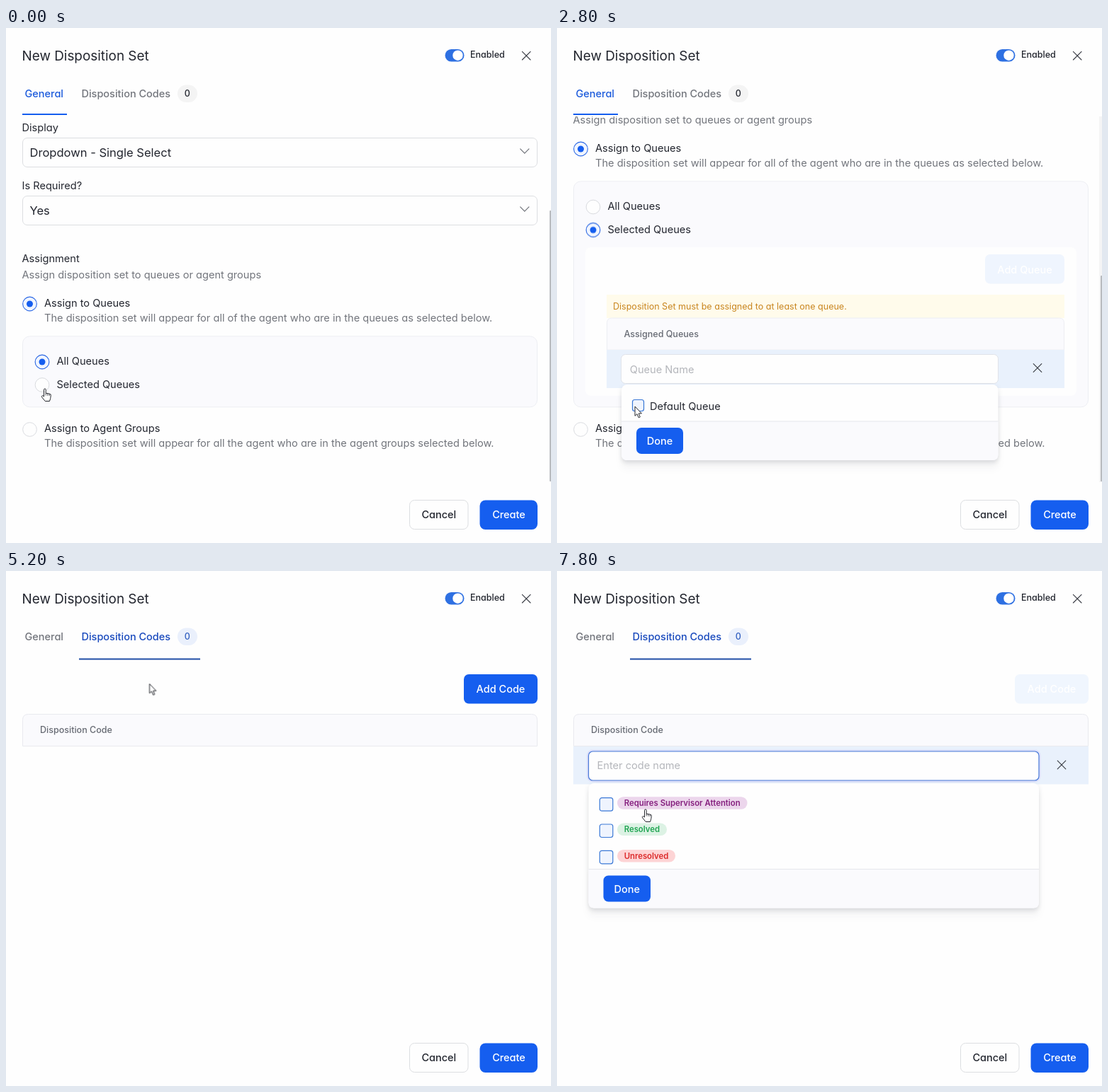
An HTML page that plays this animation: 769x728 px, repeating every 8000 ms.

```html
<!DOCTYPE html>
<html lang="en">
<head>
<meta charset="utf-8">
<title>New Disposition Set</title>
<style>
html, body { margin: 0; width: 100%; height: 100%; overflow: hidden; background: #fefefe; }
svg { display: block; width: 769px; height: 728px; }
text { font: 400 14.6px Inter, "Noto Sans", sans-serif; font-feature-settings: "cv11"; font-optical-sizing: none; fill: #23262f; white-space: pre; }
.title { font-size: 18.9px; }
.value { font-size: 16.56px; }
.mid { font-size: 14.49px; font-weight: 500; }
.small { font-size: 12.54px; }
.pill { font-size: 11.33px; font-weight: 600; }
.grey { fill: #72757c; }
.head { fill: #666a73; }
.hint { fill: #b4b6bb; }
.white { fill: #fff; }
.warn { fill: #c98620; }
.btn { fill: #155eef; }
.box { fill: #fefefe; stroke: #dcdee1; }
.panel { fill: #fafafd; stroke: #edeef3; }
.row { fill: #e9f1fc; }
.line { fill: none; stroke: #3a3d45; stroke-width: 1.15; stroke-linecap: round; stroke-linejoin: round; }
.edge { stroke: #e6e7ec; }
.check { fill: #eff4fe; stroke: #3a78d6; stroke-width: 1.2; }
.focus { fill: none; stroke: #dcdffa; stroke-width: 5; }
.focus + rect { fill: #fefefe; stroke: #4678d8; stroke-width: 1.2; }
.menu { filter: drop-shadow(0 3px 3px rgba(16,24,40,.13)) drop-shadow(0 11px 5px rgba(16,24,40,.04)); }

/* 2.5% of the loop is one 200 ms step */
.t { animation: 8s step-end infinite; }
.general { animation-name: general; }
.codes { animation-name: codes; }
.scroll { animation-name: scroll; }
.thumb { animation-name: thumb; fill: #b9bbbf; }
.track { animation-name: menu; fill: #f4f4f5; }
.all { animation-name: all; }
.selected { animation-name: selected; }
.outer { animation-name: outer; }
.inner { animation-name: inner; }
.agents { animation-name: agents; }
.table { animation-name: table; }
.warning { animation-name: warning; }
.edit { animation-name: edit; }
.pick { animation-name: menu; }
.queueFocus { animation-name: queueFocus; }
.ticked { animation-name: ticked; }
.assigned { animation-name: assigned; }
.addQueue { animation-name: addQueue; }
.addCode { animation-name: addCode; }
.codeRow { animation-name: codeRow; }
.codeMenu { animation-name: codeMenu; }
.codeCaret { animation-name: codeCaret; }
.cursor { animation-name: move; }
.arrow { animation-name: arrow; }
.hand { animation-name: hand; }

@keyframes general { 0% { opacity: 1 } 57.5% { opacity: 0 } }
@keyframes codes { 0% { opacity: 0 } 57.5% { opacity: 1 } }
@keyframes scroll { 0% { transform: translateY(0) } 22.5% { transform: translateY(-219px) } }
@keyframes thumb {
  0% { y: 258px; height: 383px }
  7.5% { y: 231px; height: 310px }
  22.5% { y: 350px; height: 291px }
  45% { y: 345px; height: 284px }
}
@keyframes all { 0% { opacity: 1 } 7.5% { opacity: 0 } }
@keyframes selected { 0% { opacity: 0 } 7.5% { opacity: 1 } }
@keyframes outer { 0% { height: 100px } 7.5% { height: 265px } 22.5% { height: 319px } 45% { height: 343px } }
@keyframes inner { 0% { height: 156px } 22.5% { height: 210px } 45% { height: 233px } }
@keyframes agents {
  0% { transform: translateY(0) }
  7.5% { transform: translateY(165px) }
  22.5% { transform: translateY(219px) }
  45% { transform: translateY(242.5px) }
}
@keyframes table { 0% { transform: translateY(0) } 45% { transform: translateY(-32.5px) } }
@keyframes warning { 0% { opacity: 1 } 45% { opacity: 0 } }
@keyframes edit { 0% { opacity: 0 } 22.5% { opacity: 1 } }
@keyframes menu { 0% { opacity: 0 } 22.5% { opacity: 1 } 45% { opacity: 0 } }
@keyframes queueFocus { 0% { opacity: 0 } 22.5% { opacity: 1 } 35% { opacity: 0 } }
@keyframes ticked { 0% { opacity: 0 } 37.5% { opacity: 1 } }
@keyframes assigned { 0% { opacity: 0 } 45% { opacity: 1 } }
@keyframes addQueue { 0% { fill: #155eef } 15% { fill: #004eeb } 25% { fill: #eff5fe } }
@keyframes addCode {
  0% { fill: #155eef }
  72.5% { fill: #004eeb }
  77.5% { fill: #155eef }
  82.5% { fill: #93b3fb }
  85% { fill: #f0f6fe }
}
@keyframes codeRow { 0% { opacity: 0 } 82.5% { opacity: 1 } }
@keyframes codeMenu { 0% { opacity: 0 } 85% { opacity: 1 } }
@keyframes codeCaret { 0% { opacity: 0 } 85% { opacity: 1 } 97.5% { opacity: 0 } }
@keyframes move {
  0% { transform: translate(55px, 510px) }
  5% { transform: translate(55px, 510px); animation-timing-function: steps(4) }
  15% { transform: translate(619.5px, 562px) }
  22.5% { transform: translate(619.5px, 562px); animation-timing-function: steps(4) }
  32.5% { transform: translate(110px, 535px) }
  37.5% { transform: translate(110px, 535px); animation-timing-function: steps(2) }
  42.5% { transform: translate(140px, 582px) }
  47.5% { transform: translate(138px, 544px) }
  50% { transform: translate(145px, 400px); animation-timing-function: steps(2) }
  55% { transform: translate(168px, 95px) }
  60% { transform: translate(168px, 95px); animation-timing-function: steps(2) }
  65% { transform: translate(202.5px, 159.5px) }
  67.5% { transform: translate(300px, 118px); animation-timing-function: steps(2) }
  72.5% { transform: translate(695px, 168px) }
  75% { transform: translate(695px, 168px); animation-timing-function: steps(2) }
  80% { transform: translate(162px, 216px) }
  82.5% { transform: translate(210.5px, 237px); animation-timing-function: steps(5) }
  95% { transform: translate(135px, 352px) }
  97.5% { transform: translate(125px, 337px) }
}
@keyframes arrow {
  0% { opacity: 0 } 7.5% { opacity: 1 } 15% { opacity: 0 } 22.5% { opacity: 1 }
  37.5% { opacity: 0 } 47.5% { opacity: 1 } 55% { opacity: 0 } 62.5% { opacity: 1 }
  72.5% { opacity: 0 } 77.5% { opacity: 1 } 92.5% { opacity: 0 }
}
@keyframes hand {
  0% { opacity: 1 } 7.5% { opacity: 0 } 15% { opacity: 1 } 22.5% { opacity: 0 }
  37.5% { opacity: 1 } 47.5% { opacity: 0 } 55% { opacity: 1 } 62.5% { opacity: 0 }
  72.5% { opacity: 1 } 77.5% { opacity: 0 } 92.5% { opacity: 1 }
}
</style>
</head>
<body>
<svg viewBox="0 0 769 728">
  <defs>
    <circle id="off" r="9.85" fill="#fefefe" stroke="#d9dbdf"/>
    <g id="on">
      <circle r="9.85" fill="#f0f5ff" stroke="#2c69e6" stroke-width="1.1"/>
      <circle r="4.5" fill="#155eef"/>
    </g>
    <path id="cross" class="line" d="M-5.8-5.8 5.8 5.8M5.8-5.8-5.8 5.8"/>
    <path id="chevron" class="line" d="M-6.1-3.2 0 3.2 6.1-3.2" style="stroke:#6d7077"/>
    <rect id="tick" class="check" width="18.5" height="18.5" rx="3"/>
    <clipPath id="view"><rect y="125" width="769" height="517"/></clipPath>
  </defs>

  <text class="title" x="22.5" y="45.5">New Disposition Set</text>
  <rect x="619.5" y="30" width="27" height="17.5" rx="8.75" fill="#2e70e2"/>
  <circle cx="637.5" cy="38.7" r="7.2" fill="#fff"/>
  <text class="mid small" x="655" y="42.3">Enabled</text>
  <use href="#cross" x="734.2" y="39.2"/>

  <g class="t general">
    <text class="mid" x="26.5" y="98" style="fill:#1c5bdc">General</text>
    <text class="mid grey" x="106.5" y="98">Disposition Codes</text>
    <rect x="23" y="121" width="63" height="2" fill="#155eef"/>
    <rect x="242" y="80.5" width="28" height="24.5" rx="12.2" fill="#f4f4f4"/>
    <text class="mid small" x="255.7" y="97.3" text-anchor="middle">0</text>

    <g clip-path="url(#view)">
      <g class="t scroll">
        <text x="22.5" y="146">Display</text>
        <rect class="box" x="23.5" y="155.5" width="726" height="41" rx="6.5"/>
        <text class="value" x="33.5" y="181.5">Dropdown - Single Select</text>
        <use href="#chevron" x="731.8" y="174"/>
        <text x="22.5" y="228">Is Required?</text>
        <rect class="box" x="23.5" y="237.5" width="726" height="41" rx="6.5"/>
        <text class="value" x="33.5" y="263.5">Yes</text>
        <use href="#chevron" x="731.8" y="256"/>

        <text x="22.5" y="331">Assignment</text>
        <text class="grey" x="22.5" y="354">Assign disposition set to queues or agent groups</text>
        <use href="#on" x="33.5" y="390"/>
        <text x="54" y="394">Assign to Queues</text>
        <text class="grey" x="54" y="414.7">The disposition set will appear for all of the agent who are in the queues as selected below.</text>

        <rect class="panel t outer" x="23.5" y="435.8" width="726" height="100" rx="10"/>
        <use href="#off" x="51" y="472"/>
        <use href="#on" class="t all" x="51" y="472"/>
        <text x="71.5" y="476">All Queues</text>
        <use href="#off" x="51" y="504.5"/>
        <use href="#on" class="t selected" x="51" y="504.5"/>
        <text x="71.5" y="508.5">Selected Queues</text>

        <g class="t agents">
          <use href="#off" x="33.5" y="567.5"/>
          <text x="54" y="571.3">Assign to Agent Groups</text>
          <text class="grey" x="54" y="592">The disposition set will appear for all the agent who are in the agent groups selected below.</text>
        </g>

        <g class="t selected">
          <g transform="translate(0 219)">
            <rect class="t inner" x="40" y="310" width="693" height="156" rx="8" fill="#fefefe"/>
            <rect class="btn t addQueue" x="604" y="320" width="112" height="41.5" rx="7"/>
            <text class="mid white" x="660" y="346.7" text-anchor="middle">Add Queue</text>
            <g class="t warning">
              <rect x="70" y="377" width="646" height="33" fill="#fffbeb"/>
              <text class="small warn" x="79" y="397.5">Disposition Set must be assigned to at least one queue.</text>
            </g>
            <g class="t table">
              <g class="t assigned">
                <rect class="edge" x="70.5" y="410" width="645" height="154.5" rx="7" fill="#fefefe"/>
                <text x="94.5" y="542.3">Default Queue</text>
                <path class="line" style="stroke:#d12a2a;stroke-width:1.3" d="M643.5 531h11.6M646.8 531v-2h5v2M645 531v11h8.8V531M647.8 534v5M651 534v5"/>
              </g>
              <path class="panel" d="M70.5 455V417q0-7 7-7h631q7 0 7 7v38z"/>
              <text class="mid small head" x="94.5" y="436.5">Assigned Queues</text>
              <g class="t edit">
                <rect class="row" x="70" y="455" width="646" height="54"/>
                <rect class="box" x="90.5" y="461.5" width="532" height="41" rx="6" style="stroke:#e0e3e9"/>
                <g class="t queueFocus">
                  <rect class="focus" x="90.5" y="461.5" width="532" height="41" rx="6"/>
                  <rect x="90.5" y="461.5" width="532" height="41" rx="6"/>
                  <rect x="103.3" y="473.5" width="1.2" height="18" fill="#333"/>
                </g>
                <text class="hint" x="102.8" y="487.5">Queue Name</text>
                <use href="#cross" x="678" y="480.5"/>
              </g>
            </g>
            <g class="t pick">
              <g class="menu">
                <rect x="91" y="504" width="531.5" height="107" rx="8" fill="#fefefe"/>
                <path d="M91 556h531.5v47q0 8-8 8H99q-8 0-8-8z" fill="#fafafd"/>
              </g>
              <path class="edge" d="M91 556h531.5"/>
              <rect class="check" x="106.5" y="525.5" width="16" height="16" rx="3"/>
              <path class="line t ticked" d="M110.5 533.8l3 3 5.5-6" style="stroke:#155eef"/>
              <text x="131" y="539.7">Default Queue</text>
              <rect class="btn" x="112" y="565" width="66" height="37" rx="7"/>
              <text class="mid white" x="145" y="588.7" text-anchor="middle">Done</text>
            </g>
          </g>
        </g>
      </g>
    </g>
    <rect class="t track" x="765" y="125" width="4" height="517"/>
    <rect class="t thumb" x="767" y="258" width="3" height="383" rx="1"/>
  </g>

  <g class="t codes">
    <text class="mid grey" x="26.5" y="98">General</text>
    <text class="mid" x="106.5" y="98" style="fill:#1849bd">Disposition Codes</text>
    <rect x="103" y="123.5" width="171" height="2" fill="#1f4da6"/>
    <rect x="242" y="80.5" width="28" height="24.5" rx="12.2" fill="#eaf0fc"/>
    <text class="mid small" x="255.7" y="97.3" text-anchor="middle" style="fill:#315fc0">0</text>

    <rect class="btn t addCode" x="646" y="146" width="104" height="41.5" rx="7"/>
    <text class="mid white" x="698" y="172" text-anchor="middle">Add Code</text>
    <path class="panel" d="M23.5 247.5V210.5q0-8 8-8h710q8 0 8 8v37z" style="stroke:#e9eaef"/>
    <text class="mid small head" x="48" y="229">Disposition Code</text>

    <g class="t codeRow">
      <rect class="row" x="23" y="248" width="727" height="53.5"/>
      <rect class="box" x="44.5" y="255" width="635.5" height="41" rx="6" style="stroke:#e0e3e9"/>
      <g class="t codeMenu">
        <rect class="focus" x="44.5" y="255" width="635.5" height="41" rx="6"/>
        <rect x="44.5" y="255" width="635.5" height="41" rx="6"/>
      </g>
      <rect class="t codeCaret" x="57" y="266.5" width="1.2" height="18" fill="#333"/>
      <text class="hint" x="56.5" y="280.3">Enter code name</text>
      <use href="#cross" x="712" y="274"/>
    </g>

    <g class="t codeMenu">
      <g class="menu">
        <rect x="44.5" y="300" width="635.5" height="176.5" rx="8" fill="#fefefe"/>
        <path d="M44.5 421.5H680v47q0 8-8 8H52.5q-8 0-8-8z" fill="#fafafd"/>
      </g>
      <path class="edge" d="M44.5 421.5H680"/>
      <use href="#tick" x="60.3" y="320.7"/>
      <rect x="85" y="319.3" width="183.5" height="17.5" rx="8.7" fill="#ecd6ec"/>
      <text class="pill" x="94.7" y="332" style="fill:#86207f">Requires Supervisor Attention</text>
      <use href="#tick" x="60.3" y="358"/>
      <rect x="85" y="356.6" width="70" height="17.5" rx="8.7" fill="#dcf2e4"/>
      <text class="pill" x="94.7" y="369.3" style="fill:#20a552">Resolved</text>
      <use href="#tick" x="60.3" y="395.3"/>
      <rect x="85" y="394" width="82" height="17.5" rx="8.7" fill="#fdd4d5"/>
      <text class="pill" x="94.7" y="406.7" style="fill:#dc2a2a">Unresolved</text>
      <rect class="btn" x="65.5" y="430.5" width="66.5" height="37" rx="7"/>
      <text class="mid white" x="98.7" y="454.5" text-anchor="middle">Done</text>
    </g>
  </g>

  <rect class="box" x="569.5" y="667.5" width="82.5" height="41" rx="7"/>
  <text class="mid" x="610.8" y="693" text-anchor="middle">Cancel</text>
  <rect class="btn" x="668.5" y="667.5" width="81.5" height="41.5" rx="8"/>
  <text class="mid white" x="709.5" y="693" text-anchor="middle">Create</text>

  <g class="t cursor" fill="#fff" stroke="#24262c" stroke-linejoin="round">
    <path class="t arrow" d="M0 0V13.3L3 10.6 5.2 15.8 7.3 14.9 5.2 9.9H9.4Z"/>
    <g class="t hand">
      <path d="M-1.5 10V1.3Q-1.5 0-.1 0 1.2 0 1.2 1.3V6.2L6.8 7.2Q8.5 7.6 8.3 9.5L7.7 13.6 6.5 17.5H.2L-4.4 11.8Q-5.2 10.3-3.9 9.7-3 9.4-1.5 11Z"/>
      <path d="M1.2 6v3.5M3.8 6.8v3M6.2 7.3v2.8" stroke-width=".8"/>
    </g>
  </g>
</svg>
</body>
</html>
```
